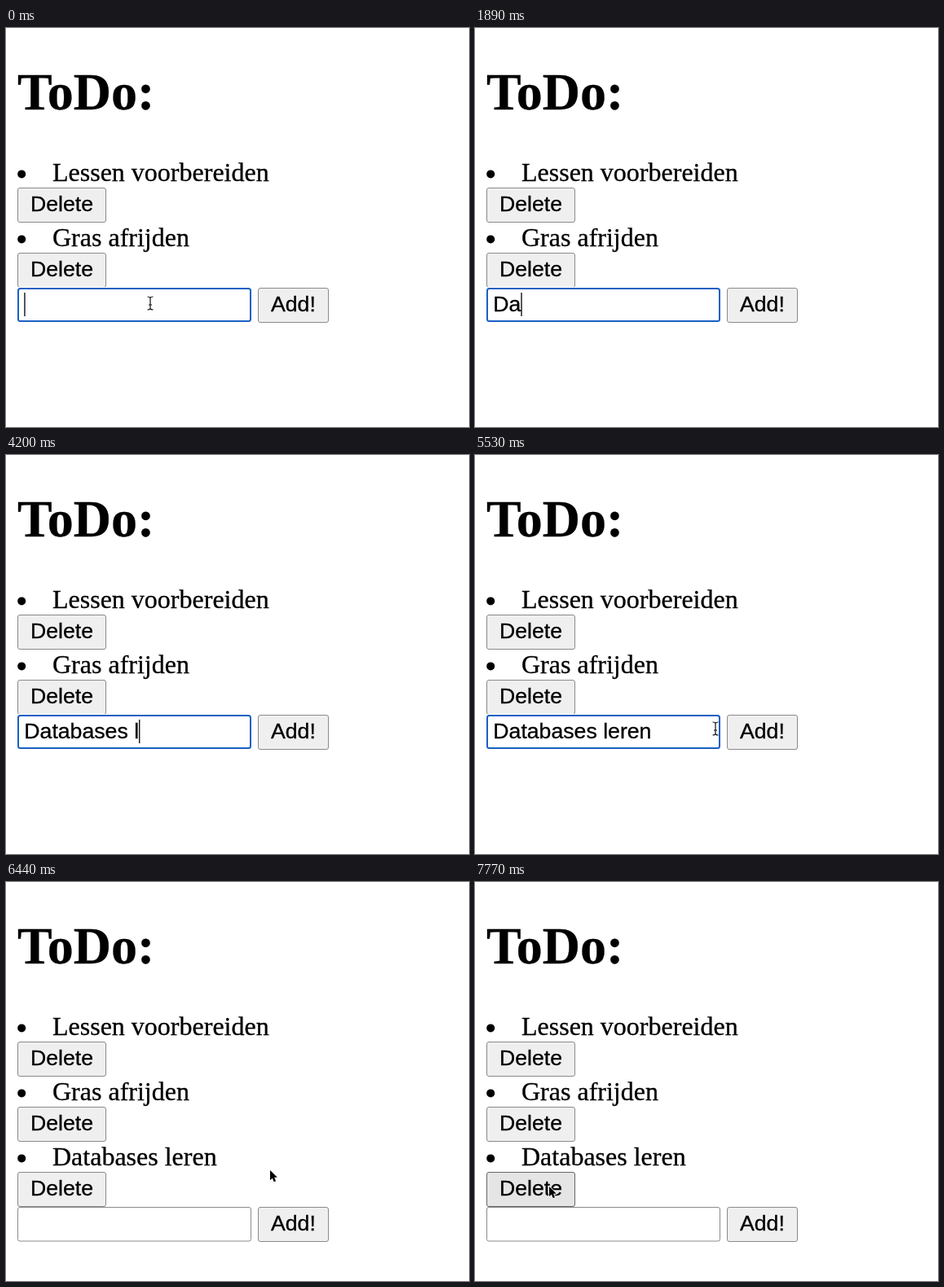
An HTML page with a canvas for the animation above (8 s loop, 568 px wide and 490 px high).

```html
<!DOCTYPE html>
<html lang="nl">
<head>
<meta charset="utf-8">
<title>ToDo</title>
<style>
  html, body { margin: 0; width: 100%; height: 100%; overflow: hidden; background: #fff; }
  canvas { display: block; }
</style>
</head>
<body>
<canvas id="stage" width="568" height="490"></canvas>
<script>
const ctx = document.getElementById('stage').getContext('2d');
const SERIF = '"Liberation Serif", serif';
const SANS = '26.67px "Liberation Sans", sans-serif';
const LOOP = 8000, STEP = 70;
const KEY_INTERVAL = 160, BLINK = 490;
const PRESS = 6300, ADDED = 6440;

const BURSTS = [
  { start: 1610, keys: 'Datab' },
  { start: 2660, keys: 'ase' },
  { start: 3850, keys: 's leren' }
];
const ENTRY = BURSTS.map(burst => burst.keys).join('');

const MOVES = [
  { start: 5180, end: 5530, from: [177, 338], to: [295, 336] },
  { start: 5530, end: 6160, from: [295, 336], to: [324, 354] },
  { start: 7210, end: 7770, from: [324, 354], to: [91, 374] }
];

const clamp = (v, lo, hi) => Math.min(hi, Math.max(lo, v));
const ease = k => k * k * (3 - 2 * k);

function pointerAt(t) {
  const move = MOVES.findLast(m => m.start <= t) || MOVES[0];
  const k = ease(clamp((t - move.start) / (move.end - move.start), 0, 1));
  return move.from.map((v, i) => v + (move.to[i] - v) * k);
}

// Typed text and the time of the latest key, which restarts the caret blink.
function typingAt(t) {
  let value = '', lastKey = -STEP;
  for (const { start, keys } of BURSTS) {
    const count = clamp(Math.floor((t - start) / KEY_INTERVAL) + 1, 0, keys.length);
    if (count) lastKey = start + (count - 1) * KEY_INTERVAL;
    value += keys.slice(0, count);
  }
  return { value, caret: Math.floor((t - lastKey) / BLINK) % 2 === 0 };
}

function text(str, x, y, font, weight = 0.3) {
  ctx.font = font;
  ctx.fillStyle = ctx.strokeStyle = '#000';
  ctx.lineWidth = weight;
  ctx.fillText(str, x, y);
  ctx.strokeText(str, x, y);
}

function box(x, y, w, h, fill, stroke, line = 1) {
  ctx.beginPath();
  ctx.roundRect(x, y, w, h, 2.5);
  ctx.fillStyle = fill;
  ctx.fill();
  ctx.strokeStyle = stroke;
  ctx.lineWidth = line;
  ctx.stroke();
}

function button(label, x, y, w, [px, py], pressed) {
  const hover = px >= x && px <= x + w && py >= y && py <= y + 43;
  const fill = pressed ? '#f5f5f5' : hover ? '#e5e5e5' : '#efefef';
  const stroke = pressed ? '#a0a0a0' : hover ? '#666' : '#8a8a8a';
  box(x + 0.5, y + 0.5, w - 1, 42, fill, stroke);
  text(label, x + 16, y + 29, SANS);
}

function item(label, y, pointer) {
  ctx.beginPath();
  ctx.arc(19.2, y - 8.6, 5, 0, Math.PI * 2);
  ctx.fillStyle = '#000';
  ctx.fill();
  text(label, 57, y, '32px ' + SERIF);
  button('Delete', 14, y + 8, 109, pointer, false);
}

function field(y, value, focused, caret) {
  if (focused) {
    box(14, y, 287, 42, '#fff', '#fff', 2);
    box(15, y + 1, 285, 40, '#fff', '#1a60c4', 2);
  } else {
    box(14.5, y + 0.5, 286, 41.5, '#fff', '#8a8a8a');
  }
  text(value, 22.3, y + 29, SANS);
  if (caret) ctx.fillRect(22.3 + ctx.measureText(value).width, y + 6, 1.3, 29);
}

function iBeam(x, y) {
  const beam = new Path2D('M-3.5-8Q-.5-8 0-6.5Q.5-8 3.5-8M-3.5 8Q-.5 8 0 6.5Q.5 8 3.5 8M0-6.5V6.5M-2 2H2');
  ctx.save();
  ctx.translate(Math.round(x), Math.round(y));
  ctx.strokeStyle = '#111';
  ctx.lineWidth = 1.2;
  ctx.stroke(beam);
  ctx.restore();
}

function arrow(x, y) {
  const shape = new Path2D('M0 0V14L3.2 11L5.4 16.2L8 15.1L5.8 10H10Z');
  ctx.save();
  ctx.translate(x, y);
  ctx.scale(0.88, 0.88);
  ctx.lineJoin = 'round';
  ctx.strokeStyle = '#fff';
  ctx.lineWidth = 2;
  ctx.stroke(shape);
  ctx.fillStyle = '#000';
  ctx.fill(shape);
  ctx.restore();
}

function draw(t) {
  const added = t >= ADDED, focused = t < PRESS;
  const pointer = pointerAt(Math.floor(t / STEP) * STEP);
  const { value, caret } = typingAt(t);
  const rowY = added ? 399 : 319;

  ctx.fillStyle = '#fff';
  ctx.fillRect(0, 0, 568, 490);
  text('ToDo:', 14, 100, 'bold 64px ' + SERIF);
  item('Lessen voorbereiden', 188, pointer);
  item('Gras afrijden', 268, pointer);
  if (added) item(ENTRY, 348, pointer);
  field(rowY, added ? '' : value, focused, focused && caret);
  button('Add!', 309, rowY, 87, pointer, t >= PRESS && !added);

  const hidden = t >= BURSTS[0].start && t < MOVES[0].start + STEP;
  const overField = !added && pointer[0] < 301;
  if (!hidden) (overField ? iBeam : arrow)(...pointer);
}

function tick() {
  draw(performance.now() % LOOP);
  requestAnimationFrame(tick);
}
tick();
</script>
</body>
</html>
```
